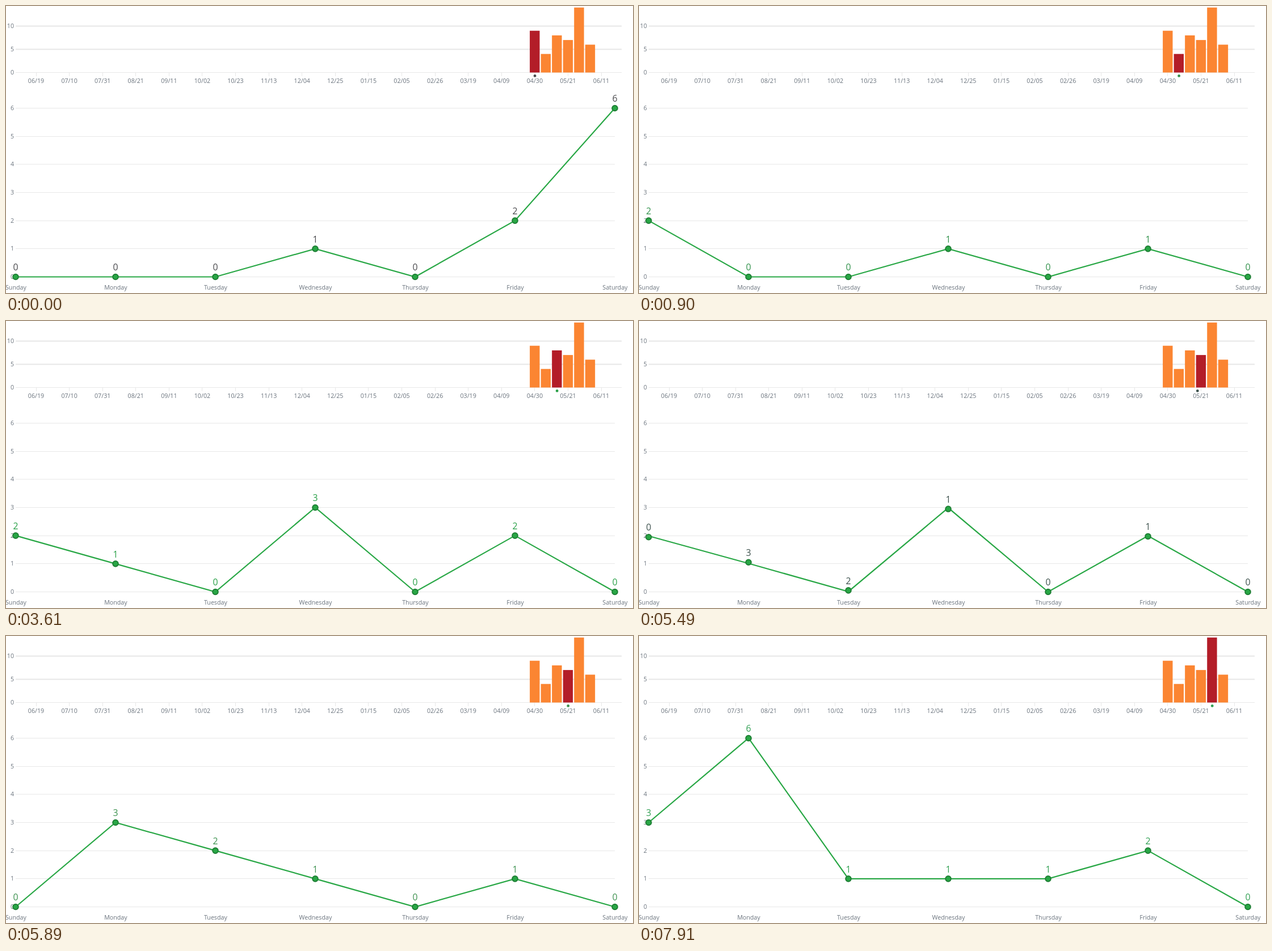
These frames come from a looping animation (1105 px wide and 507 px high, 8 s). An HTML page:

```html
<!DOCTYPE html>
<html lang="en">
<head>
<meta charset="utf-8">
<title>Weekly activity</title>
<style>
html, body { margin: 0; width: 100%; height: 100%; overflow: hidden; background: #fff; }
svg { display: block; width: 1105px; height: 507px; }
text { font-family: "Open Sans", "Noto Sans", sans-serif; }
.axis text { font-size: 10.7px; fill: #6a737d; text-anchor: middle; }
.axis .num { text-anchor: end; }
.grid { stroke: #e8e8e8; shape-rendering: crispEdges; }
.soft { stroke: #e7e7e7; stroke-width: 1.8; }
.line { fill: none; stroke: #28a745; stroke-width: 2.2; }
.point circle { fill: #28a745; stroke: #1e7e34; stroke-width: 2; }
.point text { font-size: 15.8px; text-anchor: middle; }
</style>
</head>
<body>
<svg viewBox="0 0 1105 507"><g class="axis"></g><g class="bars"></g><g class="plot"></g></svg>
<script>
const LOOP = 8000, SHOWN = 400, WEEK = 19.53, FIRST_BAR = 931.8;
const dates = ["06/19", "07/10", "07/31", "08/21", "09/11", "10/02", "10/23", "11/13", "12/04",
  "12/25", "01/15", "02/05", "02/26", "03/19", "04/09", "04/30", "05/21", "06/11"];
const dayNames = ["Sunday", "Monday", "Tuesday", "Wednesday", "Thursday", "Friday", "Saturday"];
const totals = [9, 4, 8, 7, 14, 6];

// at: when the change shows; lead: how far the transition has run by then
const weeks = [
  { at: 0, lead: 0, days: [0, 0, 0, 1, 0, 2, 6], tint: [74, 74, 78] },
  { at: 500, lead: 45, days: [2, 0, 0, 1, 0, 1, 0], tint: [50, 146, 76] },
  { at: 3210, lead: 37, days: [2, 1, 0, 3, 0, 2, 0], tint: [42, 160, 72] },
  { at: 5490, lead: 55, days: [0, 3, 2, 1, 0, 1, 0], tint: [62, 146, 80] },
  { at: 7510, lead: 45, days: [3, 6, 1, 1, 1, 2, 0], tint: [50, 160, 84] }
];
const DARK = [62, 82, 78];

const axis = document.querySelector(".axis");
const barLayer = document.querySelector(".bars");
const plot = document.querySelector(".plot");

function add(parent, tag, attrs, text) {
  const el = document.createElementNS("http://www.w3.org/2000/svg", tag);
  for (const key in attrs) el.setAttribute(key, attrs[key]);
  if (text !== undefined) el.textContent = text;
  return parent.appendChild(el);
}
const hLine = (y, x2, cls) => add(axis, "line", { x1: 17, x2, y1: y, y2: y, class: cls });
const label = (x, y, text, cls = "") => add(axis, "text", { x, y, class: cls }, text);

const barY = v => 117.5 - v * 8.2;
const dayX = i => 17 + i * 176;
const dayY = v => 478.5 - v * 49.67;

for (const v of [0, 5, 10]) {
  hLine(barY(v), 1085, v ? "soft" : "grid");
  label(14, barY(v) + 3.9, v, "num");
}
dates.forEach((d, i) => {
  const x = 53 + i * WEEK * 3;
  add(axis, "line", { x1: x, x2: x, y1: 118, y2: 124, class: "grid" });
  label(x, 136, d);
});
for (let v = 0; v <= 6; v++) {
  hLine(dayY(v), 1073, "grid");
  label(14, dayY(v) + 3.6, v, "num");
}
dayNames.forEach((d, i) => label(dayX(i) + 0.4, 501, d));

const bars = totals.map((v, i) => add(barLayer, "rect", {
  x: FIRST_BAR - 8.7 + i * WEEK, y: barY(v), width: 17.4, height: v * 8.2
}));
const marker = add(barLayer, "circle", { cy: 123.4, r: 2.4 });
const line = add(plot, "path", { class: "line" });
const points = dayNames.map((_, i) => {
  const g = add(plot, "g", { class: "point" });
  add(g, "circle", { cx: dayX(i), r: 4.8 });
  return { g, text: add(g, "text", { x: dayX(i), y: -11.3 }) };
});

const clamp = x => Math.min(1, Math.max(0, x));
const mix = (a, b, k) => a + (b - a) * k;
const rgb = (a, b, k) => `rgb(${a.map((c, i) => Math.round(mix(c, b[i], k)))})`;
const cubicInOut = x => x < 0.5 ? 4 * x ** 3 : 1 - 4 * (1 - x) ** 3;
const backOut = x => 1 + (x - 1) ** 2 * (2.70158 * (x - 1) + 1.70158);

function draw(t) {
  let n = weeks.length - 1;
  while (weeks[n].at > t) n--;
  const now = weeks[n], before = weeks[Math.max(0, n - 1)];
  const since = t - now.at;
  const age = since < SHOWN ? since + now.lead : Infinity;
  const part = ms => n ? clamp(age / ms) : 1;
  const value = (i, k) => mix(before.days[i], now.days[i], k);
  const dotK = cubicInOut(part(300)), lineK = cubicInOut(part(500));
  const fade = n ? clamp(since / SHOWN) : 1;
  const tint = rgb(DARK, now.tint, fade);

  bars.forEach((b, i) => b.setAttribute("fill", i === n ? "#b31d28" : "#fb8532"));
  marker.setAttribute("cx", FIRST_BAR + 0.3 + WEEK * mix(Math.max(0, n - 1), n, backOut(part(300))));
  marker.setAttribute("fill", tint);
  line.setAttribute("d", "M" + now.days.map((_, i) => `${dayX(i)},${dayY(value(i, lineK))}`).join("L"));
  points.forEach((p, i) => {
    p.g.setAttribute("transform", `translate(0 ${dayY(value(i, dotK))})`);
    p.text.textContent = now.days[i];
    const steady = i === 0 && before.days[0] === now.days[0];
    p.text.setAttribute("fill", steady ? rgb(before.tint, now.tint, fade) : tint);
  });
}

const start = performance.now();
function tick() {
  draw((performance.now() - start) % LOOP);
  requestAnimationFrame(tick);
}
tick();
</script>
</body>
</html>
```
